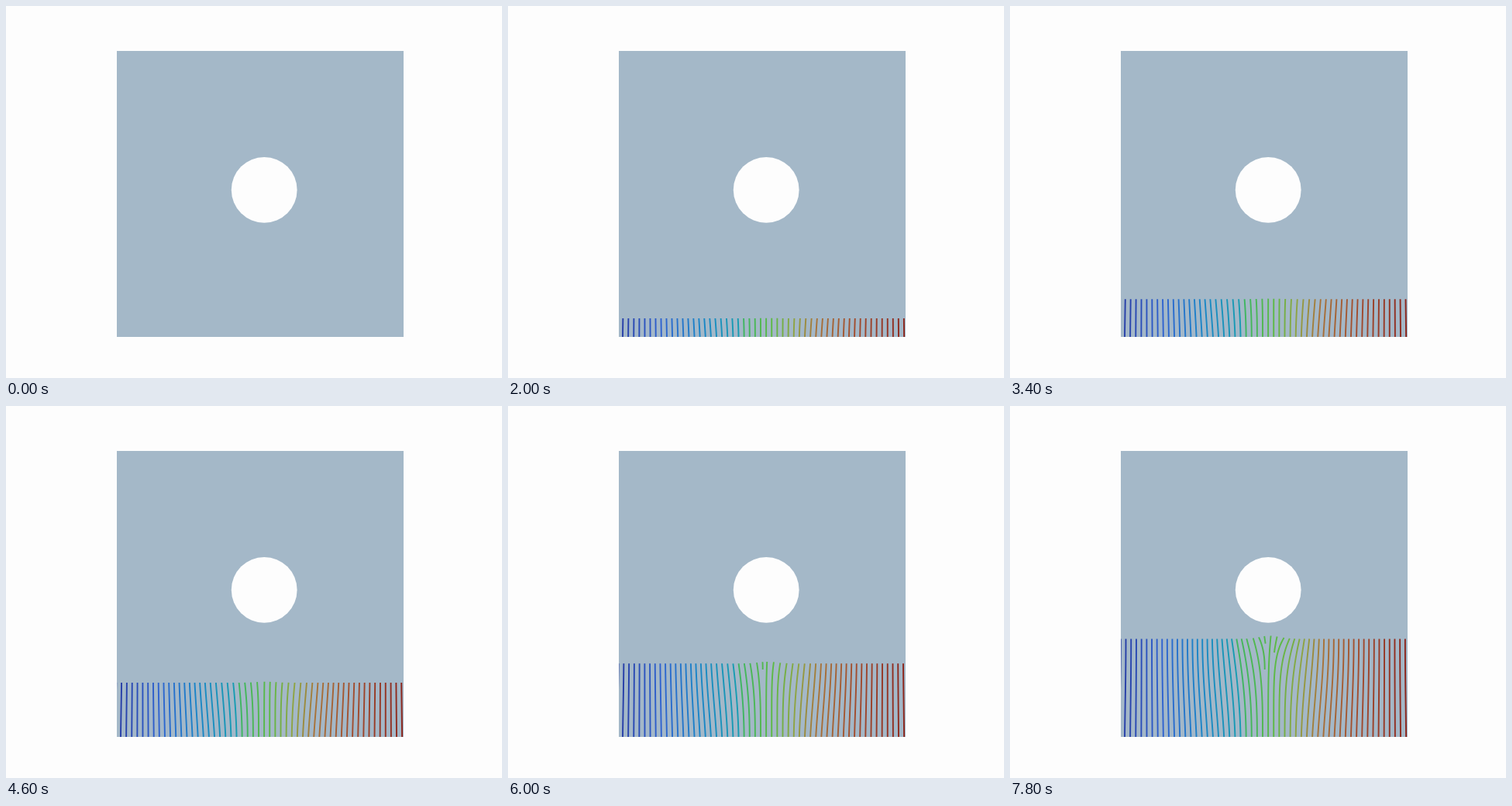
Write an HTML page with a canvas that moves like this. It is 640x480 px and loops after 8 s.

```html
<!DOCTYPE html>
<html lang="en">
<head>
<meta charset="utf-8">
<title>Flow around a cylinder</title>
<style>
  html, body { margin: 0; width: 100%; height: 100%; overflow: hidden; background: #fdfdfd; }
  canvas { display: block; }
</style>
</head>
<body>
<canvas id="stage" width="640" height="480"></canvas>
<script>
const ctx = document.getElementById('stage').getContext('2d');
const LOOP = 8000, STEP = 200, FIRST_STEP = 3;
const RISE = 3.534;              // height gained per step
const FULL = 127.2;              // height at the end of the loop
const BOX = { x: 143, y: 58, w: 370, h: 369 };
const PAPER = '#fdfdfd', FIELD = '#a4b8c8';

// Line colour by index: [index, r, g, b]
const STOPS = [
  [0, 38, 62, 168], [7, 46, 98, 208], [14, 26, 132, 200], [21, 22, 156, 178],
  [22, 62, 182, 96], [27, 92, 186, 68], [31, 142, 164, 66],
  [35, 168, 114, 56], [42, 162, 76, 46], [52, 138, 32, 24]
];

function lineColor(i) {
  const k = Math.max(1, STOPS.findIndex(s => s[0] >= i));
  const a = STOPS[k - 1], b = STOPS[k];
  const f = Math.max(0, (i - a[0]) / (b[0] - a[0]));
  return `rgb(${[1, 2, 3].map(n => Math.round(a[n] + (b[n] - a[n]) * f))})`;
}

// Sideways drift: outward near the cylinder, slightly inward at the walls.
// Inner lines bend late and sharply, outer lines early and then level off.
function drift(seed, h) {
  const u = seed - 332, s = h / FULL;
  const reach = 27.5 * Math.exp(-Math.hypot(u, 25) / 140) - 8.8;
  const inner = s ** (1.75 + 4 * Math.exp(-Math.abs(seed - 341) / 14));
  const outer = Math.sin(Math.PI / 2 * s ** 1.15);
  const mix = Math.exp(-((u / 55) ** 4));
  return Math.tanh(u / 4.5) * reach * (inner * mix + outer * (1 - mix));
}

// The front runs a little ahead in the middle
function frontY(x, h) {
  const lead = 4 * (h / FULL) ** 2 * Math.exp(-(((x - 335) / 18) ** 2));
  return 427.7 - h - lead;
}

const lines = [];
for (let i = -1; i < 52; i++) {
  const seed = 148 + i * 7.12;
  lines.push({ start: 0, color: lineColor(i), xAt: h => seed + drift(seed, h) });
}

// Lines that begin where the gap has grown wide
function addBranch(start, x, shift, power, color) {
  const xAt = h => x + shift * ((h - start) / (FULL - start)) ** power;
  lines.push({ start, color, xAt });
}
addBranch(86, 328.7, -7.7, 2.4, lineColor(25));
addBranch(118, 329.6, -1.4, 1, lineColor(25.3));
addBranch(107, 341, 3.6, 1.2, lineColor(27));

function drawLine(line, h) {
  if (h <= line.start) return;
  const count = Math.ceil((h - line.start) / RISE);
  ctx.beginPath();
  for (let n = 0; n <= count; n++) {
    const at = Math.min(h, line.start + n * RISE);
    const x = line.xAt(at);
    ctx.lineTo(x, frontY(x, at));
  }
  ctx.strokeStyle = line.color;
  ctx.stroke();
}

function draw(time) {
  const step = Math.floor((time % LOOP) / STEP);
  const h = Math.max(0, step - FIRST_STEP) * RISE;
  ctx.fillStyle = PAPER;
  ctx.fillRect(0, 0, 640, 480);
  ctx.fillStyle = FIELD;
  ctx.fillRect(BOX.x, BOX.y, BOX.w, BOX.h);
  ctx.fillStyle = PAPER;
  ctx.beginPath();
  ctx.arc(333.2, 237.3, 42.4, 0, Math.PI * 2);
  ctx.fill();

  ctx.save();
  ctx.beginPath();
  ctx.rect(BOX.x, BOX.y, BOX.w, BOX.h);
  ctx.clip();
  ctx.lineWidth = 1.9;
  ctx.lineJoin = 'round';
  lines.forEach(line => drawLine(line, h));
  ctx.restore();
}

const begin = performance.now();
function tick() {
  draw(performance.now() - begin);
  requestAnimationFrame(tick);
}
tick();
</script>
</body>
</html>
```
